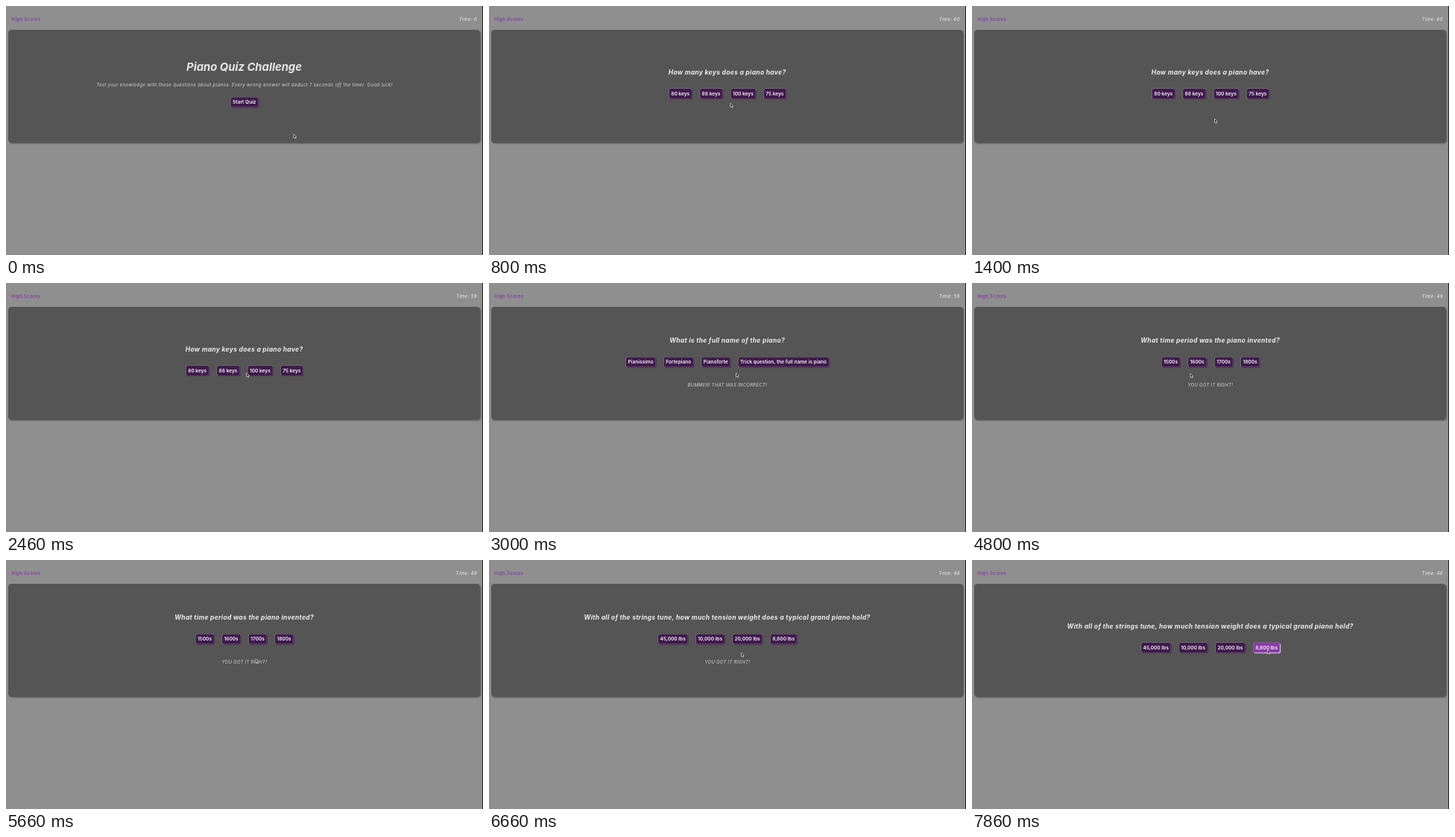
An HTML page with a canvas for the animation above (8 s loop, 640 by 334 pixels).

```html
<!DOCTYPE html>
<html lang="en">
<head>
<meta charset="utf-8">
<title>Piano Quiz Challenge</title>
<style>
html, body { margin: 0; width: 100%; height: 100%; overflow: hidden; background: #8f8f8f; }
canvas { display: block; width: 640px; height: 334px; }
</style>
</head>
<body>
<canvas id="stage"></canvas>
<script>
const LOOP = 8000, MESSAGE_TIME = 1000;
const BUTTON = { font: '600 6.55px', padding: 3.1, gap: 10.3, height: 13.7 };
const canvas = document.getElementById('stage');
const ctx = canvas.getContext('2d');
const ratio = window.devicePixelRatio || 1;
canvas.width = 640 * ratio;
canvas.height = 334 * ratio;

const screens = [
  { start: 0, buttons: ['Start Quiz'] },
  { start: 800, text: 'How many keys does a piano have?',
    buttons: ['80 keys', '88 keys', '100 keys', '75 keys'] },
  { start: 2800, text: 'What is the full name of the piano?', message: 'BUMMER! THAT WAS INCORRECT!',
    buttons: ['Pianissimo', 'Fortepiano', 'Pianoforte', 'Trick question, the full name is piano'] },
  { start: 4730, text: 'What time period was the piano invented?', message: 'YOU GOT IT RIGHT!',
    buttons: ['1500s', '1600s', '1700s', '1800s'] },
  { start: 6400, message: 'YOU GOT IT RIGHT!',
    text: 'With all of the strings tune, how much tension weight does a typical grand piano hold?',
    buttons: ['45,000 lbs', '10,000 lbs', '20,000 lbs', '8,800 lbs'] }
];

// Pointer moves: from time, to time, towards x, y
const moves = [
  [60, 500, 324, 130.5], [1200, 1400, 325.5, 151.5], [1860, 2200, 300, 120], [2200, 2600, 331.5, 121],
  [3260, 3460, 318, 163], [3660, 4270, 293, 121.5], [5000, 5300, 310, 195], [5300, 5760, 338.5, 124.5],
  [6800, 6860, 342, 131], [7130, 7620, 396.5, 120.5]
];

function pointerAt(t) {
  let x = 386, y = 172;
  for (const [from, to, toX, toY] of moves) {
    const k = Math.min(1, Math.max(0, (t - from) / (to - from)));
    const e = k * k * (3 - 2 * k);
    x += (toX - x) * e;
    y += (toY - y) * e;
  }
  return [x, y];
}

function setFont(font, spacing = 0) {
  ctx.font = font + ' Inter, sans-serif';
  ctx.letterSpacing = spacing + 'px';
}

function write(text, x, y, font, color, spacing, align = 'center') {
  setFont(font, spacing);
  ctx.textAlign = align;
  ctx.fillStyle = color;
  ctx.fillText(text, x, y);
}

function box(x, y, w, h, r, color) {
  ctx.beginPath();
  ctx.roundRect(x, y, w, h, r);
  ctx.fillStyle = color;
  ctx.fill();
}

function drawButton(label, x, y, w, [px, py]) {
  const h = BUTTON.height;
  const hover = px >= x && px <= x + w && py >= y && py <= y + h + 1;
  box(x + 1, y + 1, w, h, 2.5, hover ? '#d9d3dc' : '#40343f');
  box(x, y, w, h, 2.5, hover ? '#a262bb' : '#857a89');
  box(x + 0.6, y + 0.6, w - 0.9, h - 0.9, 2.2, hover ? '#8a3ba8' : '#3f1a4d');
  write(label, x + w / 2, y + 9.4, BUTTON.font, '#f6f2f7');
}

function drawButtons(labels, y, pointer) {
  setFont(BUTTON.font);
  const widths = labels.map(label => ctx.measureText(label).width + 2 * BUTTON.padding);
  const total = widths.reduce((sum, w) => sum + w + BUTTON.gap, -BUTTON.gap);
  let x = 319.8 - total / 2;
  labels.forEach((label, i) => {
    drawButton(label, x, y, widths[i], pointer);
    x += widths[i] + BUTTON.gap;
  });
}

function drawPointer([x, y]) {
  ctx.beginPath();
  [[0, 0], [0, 5], [1.2, 4], [2.1, 5.8], [3, 5.4], [2.2, 3.7], [3.7, 3.6]]
    .forEach(([dx, dy]) => ctx.lineTo(x + dx, y + dy));
  ctx.closePath();
  ctx.fillStyle = '#111';
  ctx.fill();
  ctx.lineWidth = 0.7;
  ctx.strokeStyle = '#eee';
  ctx.stroke();
}

function drawPage(time) {
  ctx.fillStyle = '#8f8f8f';
  ctx.fillRect(0, 0, 640, 334);
  ctx.fillStyle = '#1c1c1c';
  ctx.fillRect(639, 0, 1, 334);
  write('High Scores', 7.3, 20, '500 6px', '#8632ad', 0.38, 'left');
  write('Time: ' + time, 632, 20, 'italic 500 6px', '#e2e2e2', 0.38, 'right');
  ctx.save();
  ctx.shadowColor = 'rgba(0,0,0,.4)';
  ctx.shadowBlur = 2 * ratio;
  ctx.shadowOffsetX = ctx.shadowOffsetY = ratio;
  box(3, 32, 633, 151.5, 4.5, '#555');
  ctx.restore();
}

function draw(t) {
  const seconds = Math.floor((t - 800) / 1000);
  const penalty = t >= 3800 ? 7 : 0;
  const screen = screens.findLast(s => t >= s.start);
  const pointer = pointerAt(t);

  ctx.setTransform(ratio, 0, 0, ratio, 0, 0);
  drawPage(t < 800 ? 0 : 60 - seconds - penalty);

  let top = 122;
  if (screen.text) {
    const showMessage = screen.message && t < screen.start + MESSAGE_TIME;
    top = showMessage ? 99 : 110.5;
    write(screen.text, 319.6, top - 19, 'italic 700 8.5px', '#ececec', 0.3);
    if (showMessage) write(screen.message, 319.8, 139.3, 'italic 400 6px', '#d0d0d0', 0.27);
  } else {
    write('Piano Quiz Challenge', 319.5, 86.7, 'italic 700 14.8px', '#e6e6e6');
    write('Test your knowledge with these questions about pianos. Every wrong answer will deduct 7 seconds off the timer. Good luck!',
      320, 107.8, 'italic 400 6px', '#d4d4d4', 0.37);
  }
  drawButtons(screen.buttons, top, pointer);
  drawPointer(pointer);
}

function frame() {
  draw(performance.now() % LOOP);
  requestAnimationFrame(frame);
}
frame();
</script>
</body>
</html>
```
